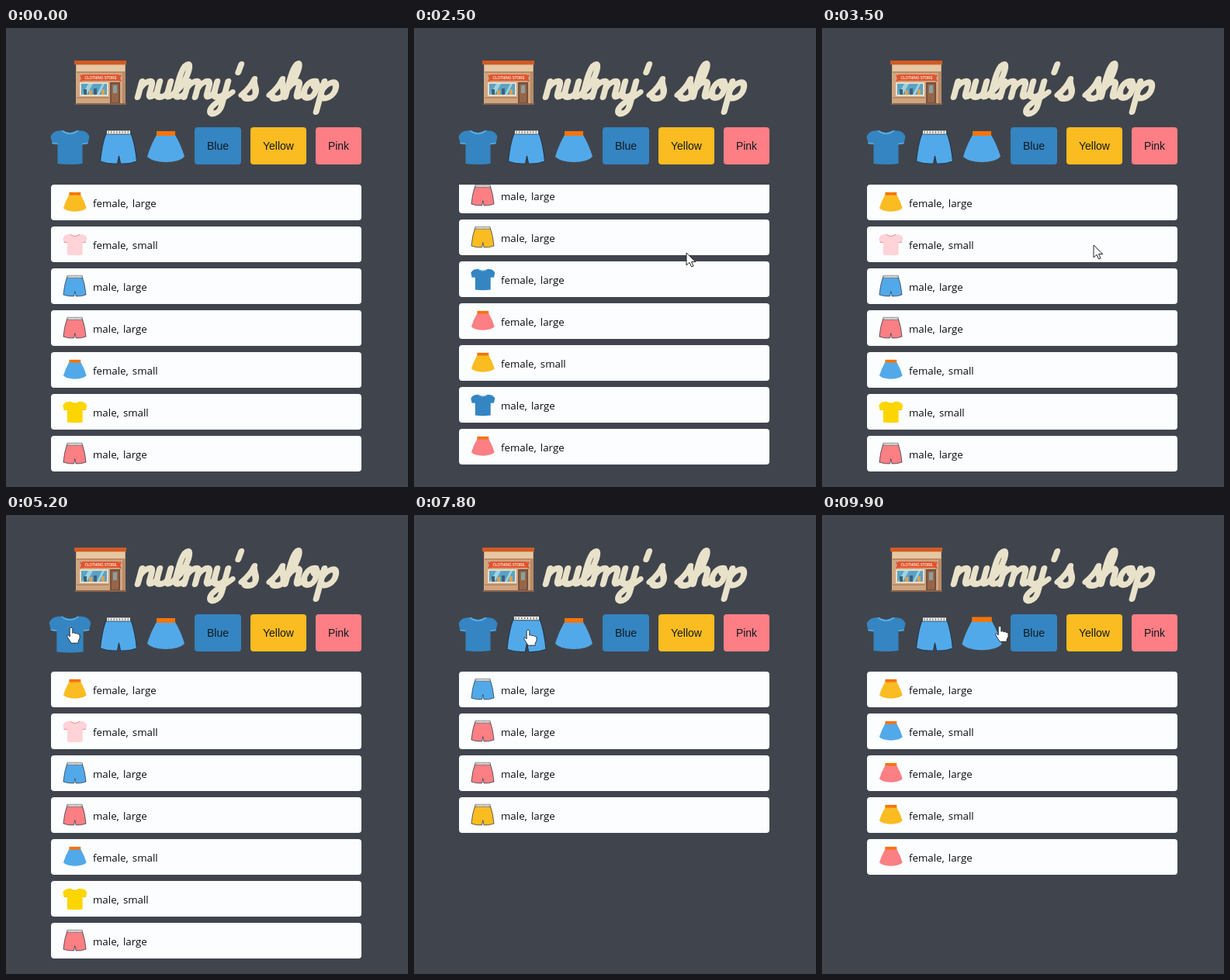
Animation of 518 by 592 pixels, one loop 10 s. Source, as an HTML page:

```html
<!DOCTYPE html>
<html lang="en">
<head>
<meta charset="utf-8">
<title>nulmy's shop</title>
<style>
  html, body { margin: 0; width: 100%; height: 100%; overflow: hidden; background: #40454d; }
  svg { display: block; }
  .row text { font: 13.3px "Open Sans", "Noto Sans", sans-serif; word-spacing: 1.6px; fill: #0c0c0c; }
  .button text { font: 14px "Liberation Sans", Arial, sans-serif; fill: #14191f; text-anchor: middle; }
  #logo { fill: none; stroke: #e9e2ca; stroke-width: 8; stroke-linecap: round; stroke-linejoin: round; }
  #cursor path { fill: #fff; stroke: #20242a; stroke-linejoin: round; }
</style>
</head>
<body>
<svg width="518" height="592" viewBox="0 0 518 592">
  <defs><clipPath id="view"><rect x="58" y="202" width="400" height="370"/></clipPath></defs>

  <g id="store">
    <path fill="#d0a681" d="M90 47H154V98H90Z"/>
    <path fill="#e6c7a2" d="M91 48H153V56H91Z"/>
    <path fill="#b98b66" d="M91 56H154V58H91ZM150 58H154V97H150ZM91 89H133V91H91Z"/>
    <path fill="#d35a22" d="M88 42H155V47H88Z"/>
    <path fill="#dc4d2c" d="M95 60L99 62V68L95 69L97 65ZM149 60L145 62V68L149 69L147 65Z"/>
    <path fill="#e2542f" d="M98 60H146V68H98Z"/>
    <text x="122" y="66" text-anchor="middle" fill="#f8dfcf" font-family="Liberation Sans, sans-serif" font-size="4.6" font-weight="bold">CLOTHING STORE</text>
    <path fill="#eadcc6" d="M95 70H132V88H95Z"/>
    <path fill="#5aa3c4" d="M97 72H130V86H97Z"/>
    <path fill="#9cd3e2" d="M98 86L106 72H112L104 86ZM117 86L124 72H127L120 86Z"/>
    <path fill="#3f5f78" d="M100 79H104V86H100ZM113 78H117V86H113Z"/>
    <path fill="#d9a250" d="M107 80H111V86H107ZM123 79H127V86H123Z"/>
    <path fill="#71503f" d="M134 70H147V97H134Z"/>
    <path fill="#996548" d="M136 72H145V96H136Z"/>
    <path fill="#8aa0a2" d="M138 74H143V84H138Z"/>
    <path fill="#8d6249" d="M89 97H155V99H89Z"/>
  </g>
  <g id="logo" role="img" aria-label="nulmy's shop"></g>
  <g id="icons"></g>
  <g id="buttons"></g>
  <g clip-path="url(#view)"><g id="list"></g></g>
  <g id="cursor">
    <path id="arrow" d="M0 0V16L4 12.4L6.6 18L9 17L6.5 11.6H11.8Z"/>
    <path id="hand" transform="scale(.92)" d="M-2 1.5Q0-1.5 2 1.5V8Q4 6 5.5 8.5Q8 7 9 9.5Q12 8.5 12 12V15L10 19V22H0L-5 14Q-7 10-4 11L-2 13Z"/>
  </g>
</svg>
<script>
const $ = id => document.getElementById(id);

// Script letters, each drawn upright from its own baseline and then slanted.
const letters = {
  n: "M0-23V-3M0-13C3-23 14-28 14-17V-8C14-2 19-2 23-9",
  u: "M0-23V-9C0-1 11-1 14-9V-23V-8C14-2 19-2 23-9",
  l: "M0-9C10-16 14-44 7-45C0-45 1-22 1-12C1-1 9-1 14-9",
  m: "M0-23V-3M0-13C3-23 14-28 14-17V-3M14-13C17-23 28-28 28-17V-8C28-2 33-2 37-9",
  y: "M0-23V-9C0-1 11-1 14-9V-23V8C14 20 2 21 1 14C0 6 14 0 23-9",
  "'": "M0-45L-1-35",
  s: "M-2-6C4-12 8-20 9-26C9-18 18-12 15-4C12 0 4 0 2-4",
  h: "M0-9C10-18 13-44 8-46C2-46 3-22 3-3M3-12C6-22 17-27 17-17V-8C17-2 21-2 25-9",
  o: "M12-23C2-25-1-14 1-7C3 0 14 0 15-10C16-20 12-24 10-22C10-15 17-14 22-18",
  p: "M0-23V16M0-10C2-20 15-28 17-15C18-3 6 2 1-4"
};
const letterX = [169, 192, 215, 229, 266, 291, 304, 0, 340, 356, 381, 404];
$("logo").innerHTML = [..."nulmy's shop"].map((c, i) => c === " " ? "" :
  `<path transform="translate(${letterX[i]} 92) skewX(-15)" d="${letters[c]}"/>`).join("");

// Clothes are drawn in a box of 50 by 48.
const garments = {
  tee: (fill, edge) => `<path fill="${fill}" d="M15 3Q25 9 35 3L43 4Q48 6 50 11L48 20L41 21V46Q25 48 9 46V21L2 20L0 11Q2 6 7 4Z"/>
    <path fill="none" stroke="${edge}" stroke-width="1.6" d="M15 3.5Q25 11 35 3.5M2 19.5L9 20.5M48 19.5L41 20.5"/>`,
  shorts: fill => `<path fill="${fill}" stroke="#27384a" stroke-width="1.2" stroke-linejoin="round" d="M9 4H40Q46 20 48 42Q37 46 27 45L25 35L23 45Q12 46 1 42Q3 20 9 4Z"/>
    <path fill="#f6f0e6" stroke="#27384a" stroke-width=".8" d="M9 2H40V7H9Z"/>
    <path fill="none" stroke="#4b4a48" stroke-width="2" stroke-dasharray="1 2.6" d="M11 4.5H39"/>`,
  skirt: fill => `<path fill="${fill}" d="M13 8H37Q45 22 49 36Q42 43 25 43Q8 43 1 36Q5 22 13 8Z"/>
    <path fill="#f4740c" d="M13 3H37V9H13Z"/>`
};
const colors = { blue: "#52a9e9", yellow: "#fbbc22", pink: "#fb7f83" };
const teeColors = {
  blue: ["#3485c2", "#5baee8"], yellow: ["#fdd601", "#f2c600"], pink: ["#ffd3d7", "#f58a92"]
};
const garment = (kind, color) =>
  kind === "tee" ? garments.tee(...teeColors[color]) : garments[kind](colors[color]);

const icons = [
  { kind: "tee", x: 57.5, y: 129 },
  { kind: "shorts", x: 120.5, y: 130 },
  { kind: "skirt", x: 181, y: 130 }
];
$("icons").innerHTML = icons.map(({ kind }) => `<g>${garment(kind, "blue")}</g>`).join("");

$("buttons").innerHTML = [["Blue", 243, 60, "#3485c2"], ["Yellow", 315, 72, colors.yellow], ["Pink", 399, 59, "#fd7f85"]]
  .map(([label, x, w, fill]) => `<g class="button"><rect x="${x}" y="128" width="${w}" height="48" rx="4" fill="${fill}"/>
    <text x="${x + w / 2}" y="157">${label}</text></g>`).join("");

const items = `skirt yellow female large
tee pink female small
shorts blue male large
shorts pink male large
skirt blue female small
tee yellow male small
shorts pink male large
shorts yellow male large
tee blue female large
skirt pink female large
skirt yellow female small
tee blue male large
skirt pink female large`.split("\n").map(line => line.split(" "));
$("list").innerHTML = items.map(([kind, color, gender, size]) => `<g class="row">
  <rect x="58" width="400" height="46" rx="4" fill="#fbfdff"/>
  <g transform="translate(73.3 8) scale(.62)">${garment(kind, color)}</g>
  <text x="112" y="29">${gender}, ${size}</text></g>`).join("");

// Tracks hold [time, ...values] and ease between neighbours.
const cursorTrack = [
  [600, 522, 340], [1200, 357, 286], [1700, 357, 286], [2300, 351, 290], [2700, 351, 290],
  [3300, 350, 280], [3800, 350, 280], [4800, 84, 145], [6600, 84, 145], [7200, 147, 148],
  [8500, 147, 148], [8900, 207, 150], [9500, 207, 150], [9800, 229, 143]
];
const scrollTrack = [[1300, 0], [1600, 91], [2300, 333], [2700, 333], [3400, 0]];
const clicks = [[5500, "tee"], [7600, "shorts"], [9100, "skirt"]];

function sample(track, t) {
  const i = track.findIndex(key => key[0] > t);
  if (i < 0) return track.at(-1).slice(1);
  if (i === 0) return track[0].slice(1);
  const [a, b] = [track[i - 1], track[i]];
  const k = (t - a[0]) / (b[0] - a[0]), e = k * k * (3 - 2 * k);
  return a.slice(1).map((v, j) => v + (b[j + 1] - v) * e);
}

const rows = [...$("list").children], iconNodes = [...$("icons").children];

function draw(now) {
  const t = Math.floor(now % 10000 / 100) * 100;
  const [x, y] = sample(cursorTrack, t), scroll = Math.round(sample(scrollTrack, t)[0]);
  const filter = clicks.findLast(([time]) => time <= t)?.[1];

  let hovering = false, slot = 0;
  icons.forEach((icon, i) => {
    const over = x >= icon.x && x <= icon.x + 50 && y >= 128 && y <= 178;
    hovering ||= over;
    iconNodes[i].setAttribute("transform",
      `translate(${icon.x + 25} ${icon.y + 24}) scale(${over ? 1.07 : 1}) translate(-25 -24)`);
  });
  rows.forEach((row, i) => {
    const shown = !filter || items[i][0] === filter;
    row.setAttribute("display", shown ? "inline" : "none");
    if (shown) row.setAttribute("transform", `translate(0 ${202 + 54 * slot++ - scroll})`);
  });
  $("cursor").setAttribute("transform", `translate(${x} ${y})`);
  $("arrow").setAttribute("display", hovering ? "none" : "inline");
  $("hand").setAttribute("display", hovering ? "inline" : "none");
  requestAnimationFrame(() => draw(performance.now()));
}
draw(performance.now());
</script>
</body>
</html>
```
